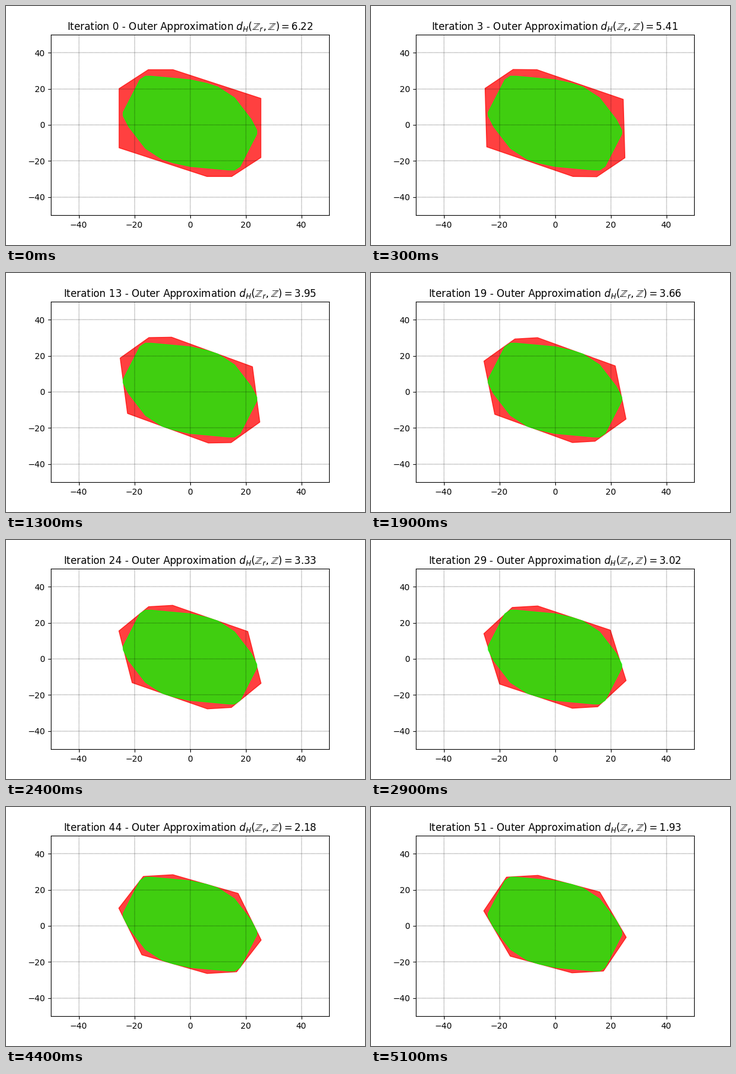
Animation of 600 by 400 pixels, one loop 5200 ms. Source, as a matplotlib script:

```python
import numpy as np
import matplotlib.pyplot as plt
from matplotlib.animation import FuncAnimation
from matplotlib.collections import PolyCollection

FRAMES, INTERVAL = 52, 100
CENTER = np.array([0, 1])
TITLE = (r"Iteration %d - Outer Approximation "
         r"$d_H(\mathbb{Z}_r,\mathbb{Z})=%.2f$")

# generators of the inner zonotope
INNER = np.array([(1, 1), (3, 9), (0, 1), (-1, 3), (-3, 6),
                  (-3, 3), (-2, 1), (-3, 1), (-7, 1), (-1, 0)])

# key poses of the outer zonotope, four generators each
TIMES = [0, 7, 19, FRAMES - 1]
POSES = np.array([
    [(4.43, 0), (15.80, -7.95), (0, -16.40), (5.25, 5.25)],
    [(4.07, -.15), (15.12, -8.56), (.70, -15.96), (4.77, 5.22)],
    [(4.06, .36), (13.96, -7.82), (1.94, -14.74), (5.57, 6.14)],
    [(5.65, .50), (11.10, -4.62), (4.76, -12.55), (4.09, 9.35)],
])


def zonotope(gens):
    """Vertices of a zonotope around the common center."""
    up = (gens[:, 1] > 0) | ((gens[:, 1] == 0) & (gens[:, 0] > 0))
    g = np.where(up[:, None], gens, -gens)
    g = g[np.argsort(np.arctan2(g[:, 1], g[:, 0]))]
    half = 2 * np.cumsum(g, axis=0) - g.sum(axis=0)
    return CENTER + np.vstack([half, -half])


def hausdorff(points):
    """Largest max-norm distance from the points to the inner zonotope."""
    normals = np.vstack([INNER[:, ::-1] * [1, -1], np.eye(2)])
    normals = normals / np.abs(normals).sum(axis=1, keepdims=True)
    support = np.abs(normals @ INNER.T).sum(axis=1)
    reach = np.abs((points - CENTER) @ normals.T)
    return (reach - support).max()


def settle(i, power=1.15):
    """Time that eases out after the last but one key pose."""
    start, end = TIMES[-2:]
    if i <= start:
        return i
    left = (end - i) / (end - start)
    return end - (end - start) * left ** power


def outer_gens(i):
    clocks = i, settle(i)
    return np.array([[np.interp(t, TIMES, POSES[:, k, axis])
                      for axis, t in enumerate(clocks)] for k in range(4)])


fig, ax = plt.subplots(figsize=(6, 4), dpi=100)
fig.subplots_adjust(left=.125, right=.9, bottom=.125, top=.88)
ax.set(xlim=(-50, 50), ylim=(-50, 50),
       xticks=range(-40, 41, 20), yticks=range(-40, 41, 20))
ax.grid(color="black", linestyle="--", linewidth=.3)

inner = zonotope(INNER)
colors = ["red", "lime"]
shapes = PolyCollection([inner, inner], facecolors=colors,
                        edgecolors=colors, linewidths=1, alpha=.75)
ax.add_collection(shapes)
title = ax.set_title("")


def update(i):
    outer = zonotope(outer_gens(i))
    shapes.set_verts([outer, inner])
    title.set_text(TITLE % (i, hausdorff(outer)))
    return shapes, title


anim = FuncAnimation(fig, update, frames=FRAMES, interval=INTERVAL,
                     repeat=True, repeat_delay=0)
plt.show()
```
